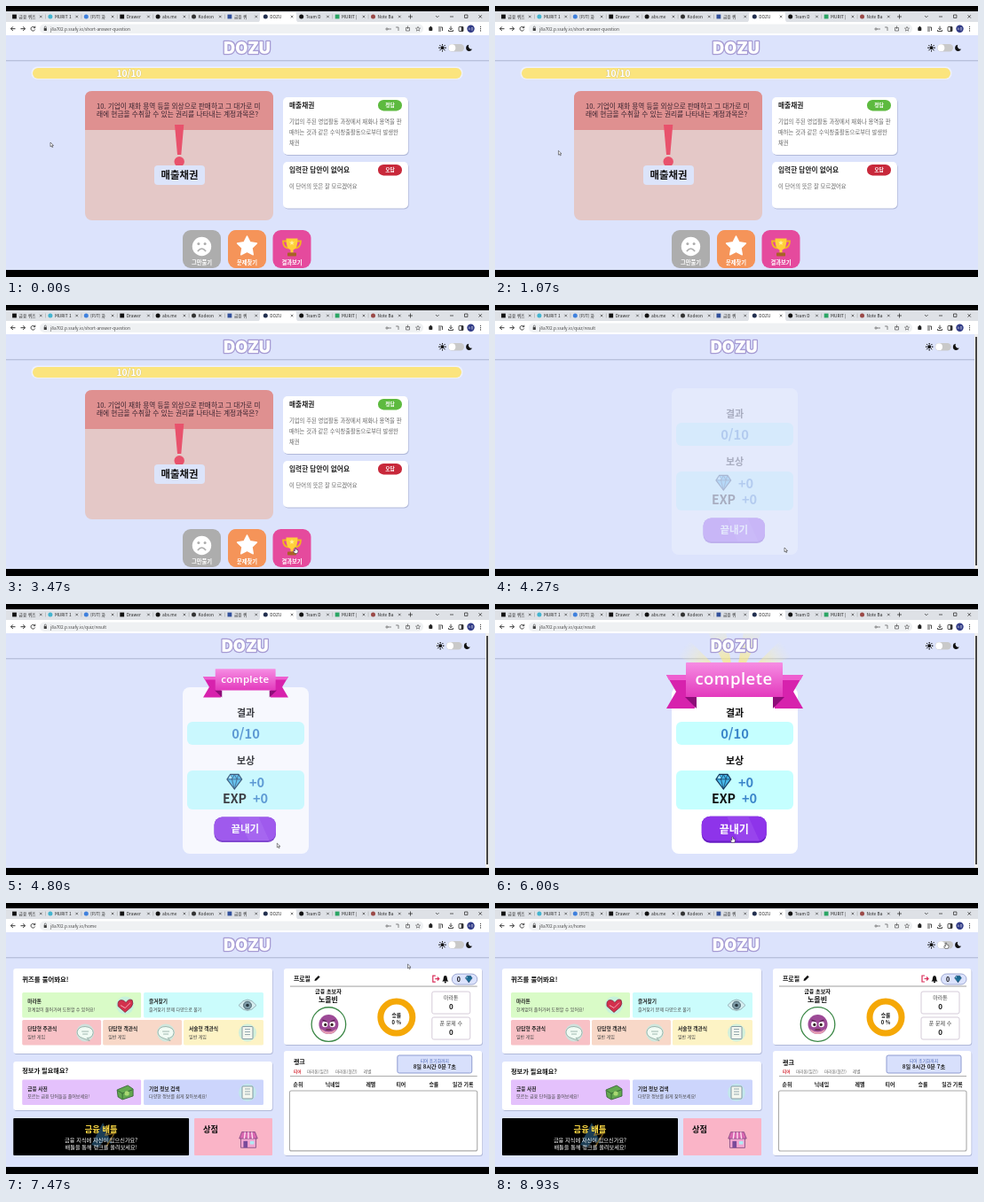
An HTML page for the animation above (8.99 s loop, 544 by 306 pixels).

```html
<!DOCTYPE html>
<html lang="ko">
<head>
<meta charset="utf-8">
<title>Quiz</title>
<style>
html, body { margin: 0; width: 100%; height: 100%; overflow: hidden; background: #000; }
svg { display: block; width: 100%; height: 100%; }
text { font-family: "Noto Sans CJK KR", "Noto Sans CJK", "Noto Sans", sans-serif; white-space: pre; }
.logo { font-family: Inter, sans-serif; font-weight: 900; }
.banner { font-family: "Open Sans", sans-serif; font-weight: 600; }
</style>
</head>
<body>
<svg id="stage" viewBox="0 0 544 306" preserveAspectRatio="none"></svg>
<script>
const LOOP = 8990, RESULT_AT = 4000, HOME_AT = 6640;
const stage = document.getElementById('stage');

// Markup helpers
const rect = (x, y, w, h, fill, r = 0, more = '') =>
  `<rect x="${x}" y="${y}" width="${w}" height="${h}" rx="${r}" fill="${fill}" ${more}/>`;
const circle = (x, y, r, fill, more = '') => `<circle cx="${x}" cy="${y}" r="${r}" fill="${fill}" ${more}/>`;
const path = (d, fill = 'none', stroke = 'none', w = 1, more = '') =>
  `<path d="${d}" fill="${fill}" stroke="${stroke}" stroke-width="${w}" ${more}/>`;
const text = (x, y, s, size, fill = '#222', bold = false, mid = false, more = '') =>
  `<text x="${x}" y="${y}" font-size="${size}" fill="${fill}"${bold ? ' font-weight="700"' : ''}${mid ? ' text-anchor="middle"' : ''} ${more}>${s}</text>`;
const group = (id, body, more = '') => `<g id="${id}" ${more}>${body}</g>`;
const at = (x, y, body, s = 1) => `<g transform="translate(${x} ${y}) scale(${s})">${body}</g>`;
const card = (x, y, w, h, r = 3, fill = '#fff') =>
  rect(x + .7, y + 1, w, h, '#8e98bd', r, 'opacity=".55"') + rect(x, y, w, h, fill, r);
const star = (n, R, r) => 'M' + Array.from({ length: n * 2 }, (_, i) => {
  const a = Math.PI * (i / n - .5), q = i % 2 ? r : R;
  return (q * Math.cos(a)).toFixed(2) + ' ' + (q * Math.sin(a)).toFixed(2);
}).join('L') + 'Z';
const gem = (fill) => path('M-5 -9H5L9 -3L0 9L-9 -3Z', fill, '#16375c', 1.2) +
  path('M-9 -3H9M-5 -9L-3 -3L0 9L3 -3L5 -9M-3 -3L0 -9L3 -3', 'none', '#16375c', .8) +
  path('M-5 -8L-3 -4H-7Z', '#b6f0ff');

function browser() {
  const tabs = [
    ['#111', '금융 퀴즈'], ['#42b4cf', 'MURIT 1'], ['#3f80dd', '[PJT] 화'], ['#111', 'Drawer'],
    ['#111', 'abs.me'], ['#333', 'Kodeon'], ['#31509b', '금융 퀴'], ['#23304f', 'DOZU'],
    ['#111', 'Team D'], ['#2ba565', 'MURIT |'], ['#9b4a48', 'Note Ba']
  ];
  let s = rect(0, 6, 544, 12.5, '#dee1e6') + rect(0, 18, 544, 15, '#fff') +
    path('M284 18.5Q286 18 286 15V9Q286 7 288 7H325Q327 7 327 9V15Q327 18 329 18.5Z', '#fff');
  tabs.forEach(([fill, name], i) => {
    const x = 9.5 + i * 40.4;
    s += (i % 3 ? circle(x, 12, 2.5, fill) : rect(x - 2.4, 9.6, 4.8, 4.8, fill)) +
      text(x + 5, 13.8, name, 4.8) +
      path(`M${x + 28.5} 10.7l2.6 2.6m0 -2.6l-2.6 2.6`, 'none', '#222', .6);
    if (i < 10 && i !== 6 && i !== 7) s += path(`M${x + 35} 9.5v5`, 'none', '#999', .5);
  });
  s += path('M453 12h5m-2.5 -2.5v5M484 11l1.8 1.8L487.6 11M500 12h4M516.5 10h3.4v3.4h-3.4zM532.5 10.2l3.4 3.4m0 -3.4l-3.4 3.4', 'none', '#222', .7);
  s += rect(38, 20.5, 432, 10.5, '#eff1f3', 5) + rect(42.7, 25, 3.2, 3, '#444', .5) +
    path('M43.3 25v-1a1 1 0 0 1 2 0v1', 'none', '#444', .6) +
    path('M10.5 25.7H5.5m2.3 -2.3l-2.3 2.3l2.3 2.3', 'none', '#222', .9) +
    path('M16.5 25.7h5m-2.3 -2.3l2.3 2.3l-2.3 2.3', 'none', '#222', .9) +
    path('M32.5 24.5a2.4 2.4 0 1 0 .2 2M32.8 22.7v2h-2', 'none', '#222', .8) +
    path('M430 26h4M439 24h3v4M450.5 24.5h4v3.5h-4zM452.5 26V22.5', 'none', '#555', .7) +
    circle(429, 26, 1.1, 'none', 'stroke="#555" stroke-width=".7"') +
    at(464, 26, path(star(5, 2.7, 1.2), 'none', '#555', .6)) +
    rect(476.3, 24, 4, 4, '#222', .8) + circle(478.4, 23.7, 1, '#222') +
    path('M487 24h4.5M487 26h3M487 28h3M491.5 24v4M501 22.7v4m-1.8 -1.6l1.8 1.6l1.8 -1.6M498.5 27v1.5h5V27', 'none', '#222', .8) +
    rect(510, 23.5, 5, 5, 'none', .5, 'stroke="#222" stroke-width=".8"') + rect(512.8, 23.5, 2, 5, '#222') +
    circle(523.5, 25.7, 4.2, '#303a86') + text(523.5, 27, '노을', 3.2, '#fff', false, true) +
    [23.5, 25.7, 27.9].map(y => circle(534.5, y, .6, '#222')).join('');
  return s + '<text id="url" x="50" y="27.6" font-size="4.8" fill="#444"></text>';
}

function header() {
  const rays = Array.from({ length: 8 }, (_, i) => `<path d="M0 -5V-7.4M0 5V7.4" transform="rotate(${i * 45}) scale(.56)" stroke="#111" stroke-width="1.5"/>`).join('');
  return text(271.5, 54, 'DOZU', 18.2, '#fff', false, true,
      'class="logo" stroke="#a69bd3" stroke-width="2.6" stroke-linejoin="round" paint-order="stroke"') +
    at(491.5, 47.2, circle(0, 0, 2, '#111') + rays) +
    rect(498, 43, 18, 8.4, '#c9c9c9', 4.2) + circle(502.4, 47.2, 3.9, '#fff') +
    path('M521.2 43.8a3.6 3.6 0 1 0 3.9 4.8a3.4 3.4 0 0 1 -3.9 -4.8Z', '#111');
}

function quiz() {
  const info = (y, h, title, fill, tag, lines) => card(312, y, 141, h, 5) +
    text(319, y + 12, title, 7.7, '#222', true) +
    rect(419, y + 3, 27, 12.4, fill, 6.2) + text(432.5, y + 11.4, tag, 5.8, '#fff', true, true) +
    lines.map((l, i) => text(319, y + 30 + i * 12, l, 6.3, '#666')).join('');
  const button = (x, fill, label, icon) => rect(x, 253, 43, 43, fill, 9) + at(x + 21.5, 271.5, icon) +
    text(x + 21.5, 291.5, label, 6.3, '#fff', true, true);
  const sad = circle(0, 0, 10.7, '#fff') + circle(-3.6, -3, 1.5, '#adadad') + circle(3.6, -3, 1.5, '#adadad') +
    path('M-4.6 5.5Q0 -.5 4.6 5.5', 'none', '#adadad', 1.6);
  const cup = path('M-6 -6H-10Q-10 1 -4 2M6 -6H10Q10 1 4 2', 'none', '#f2b321', 1.8) +
    path('M-6.5 -9H6.5Q6.5 3 1.5 4V7H-1.5V4Q-6.5 3 -6.5 -9Z', '#ffd039') +
    rect(-5, 7, 10, 4, '#a86226', .8) + path(star(5, 3, 1.3), '#fff2a0', 'none', 1, 'transform="translate(0 -4)"');
  return rect(28.5, 68.5, 486, 14.5, '#eef1ff', 7) + rect(30, 70, 483, 12, '#fbe47d', 6) +
    text(138.5, 79.6, '10/10', 10.2, '#fff', true, true, 'stroke="#c9bd86" stroke-width=".6" paint-order="stroke"') +
    rect(89, 96, 212, 146, '#e4c8c7', 8) + path('M89 140V104Q89 96 97 96H293Q301 96 301 104V140Z', '#df9090') +
    text(102, 116, '10. 기업이 재화 용역 등을 외상으로 판매하고 그 대가로 미', 7.65, '#3b2430') +
    text(102, 125.3, '래에 현금을 수취할 수 있는 권리를 나타내는 계정과목은?', 7.72, '#3b2430') +
    path('M190 134H200.3L197.3 168H193Z', '#e8526c') + circle(195.2, 175.8, 5.7, '#e8526c') +
    rect(167, 180, 57, 22, '#dce4fa', 4) + text(195.5, 195.2, '매출채권', 11.4, '#111', true, true) +
    info(103, 65, '매출채권', '#5dba3f', '정답', ['기업의 주된 영업활동 과정에서 재화나 용역을 판', '매하는 것과 같은 수익창출활동으로부터 발생한', '채권']) +
    info(176, 52.5, '입력한 답안이 없어요', '#c8293b', '오답', ['이 단어의 뜻은 잘 모르겠어요']) +
    button(199, '#adadad', '그만풀기', sad) +
    button(250, '#f59459', '문제찾기', path(star(5, 11.5, 5.8), '#fff', '#fff', 1.5, 'stroke-linejoin="round"')) +
    button(300.5, '#e54a9d', '결과보기', cup);
}

function result() {
  const blue = '#3b86ca';
  const rays = Array.from({ length: 10 }, (_, i) =>
    path('M0 0L-11 -72H11Z', 'url(#ray)', 'none', 1, `transform="rotate(${i * 36})"`)).join('');
  const tail = path('M-77 -5H-45V33H-77L-66 14Z', '#d722ad') + path('M-77 -5H-45V1H-74Z', '#ee5fd0') +
    path('M-56 20L-43 33V20Z', '#8d0d78');
  return group('rays', rays) +
    group('sheet', rect(199, 94, 142, 188, '#fff', 8) +
      text(270, 127, '결과', 11, '#111', true, true) + rect(204, 133, 132, 26, '#c5ffff', 6) +
      text(270, 152, '0/10', 14.7, blue, true, true) +
      text(270, 181, '보상', 11, '#111', true, true) + rect(204, 188, 132, 44, '#c5ffff', 6) +
      at(257.3, 200.7, gem('#45b9ea'), .93) + text(274, 206.6, '+0', 14.6, blue, true) +
      text(244, 225.4, 'EXP', 14.2, '#111', true) + text(278, 225.4, '+0', 14.6, blue, true) +
      group('done', rect(235, 240.5, 69.5, 28.5, '#671cc4', 9) + rect(235, 240.5, 69.5, 26.5, '#8e34ea', 9) +
        path('M262 240.5H285L297 267H274Z', '#a052f0', 'none', 1, 'opacity=".55"') +
        text(269.8, 258.4, '끝내기', 11.5, '#fff', true, true))) +
    group('ribbon', tail + `<g transform="scale(-1 1)">${tail}</g>` +
      rect(-55, -19, 109, 39, 'url(#pink)', 1) +
      text(-1, 6, 'complete', 18.6, '#fff', false, true, 'class="banner" letter-spacing=".4"'));
}

function home() {
  const tile = (x, y, w, fill, title, sub, icon, dx = 18) => rect(x, y, w, 28.5, fill, 1.5) +
    text(x + 6, y + 12.2, title, 5.7, '#222', true) + text(x + 6, y + 20.5, sub, 5, '#444') + at(x + w - dx, y + 14.5, icon);
  const glow = circle(0, 0, 10, '#bfeee6', 'opacity=".7"');
  const heart = glow + path('M0 8L-8 1Q-9 -6 -4 -6Q-1 -6 1 -3Q4 -8 8 -6Q10 -2 7 2Z', '#d3304c', '#74263b', .7) + path('M-5 0L0 3L6 -3', 'none', '#f6a9b8', 1);
  const eye = path('M-10 0Q0 -13 10 0Q0 12 -10 0Z', '#d5eef0', '#8aa5ac', .8) + circle(0, 0, 4.4, '#7f9ca8', 'stroke="#4a626d"') + circle(0, 0, 1.8, '#26363f');
  const bubble = glow + path('M-9 -1Q-8 -7 0 -7Q9 -6 9 0Q8 6 2 6L5 9L-3 6Q-9 4 -9 -1Z', '#f1fbf4', '#7d9b92', .7) + path('M-4 -1.5H4M-3 1.5H3', 'none', '#8aa69d', .8);
  const book = path('M-9 -3L3 -8L9 -4V4L-3 8L-8 5Z', '#63a850', '#2f5d30', .8) + path('M-8 -2L-3 1V7M-3 1L8 -3', 'none', '#2f5d30', .8) + circle(2, 1, 2.6, '#a9d874');
  const memo = glow + rect(-6, -7, 12, 14, '#f4f7ef', 1, 'stroke="#6d8290" stroke-width=".8"') + path('M-3 -4H3M-3 -1H3M-3 2H3', 'none', '#8aa0a8', .9);
  const shop = rect(-9, -2, 18, 12, '#f3a5d0', 0, 'stroke="#74407a" stroke-width=".8"') +
    path('M-8 -9H8L11 -1H-11Z', '#d867b0', '#74407a', .8) + path('M-4 -9L-5 -1M0 -9V-1M4 -9L5 -1', 'none', '#ffe0ef', 1.5) +
    rect(-6, 2, 5, 8, '#7a4a9a') + rect(2, 2, 5, 4, '#aeeaf2');
  const face = circle(0, 0, 11, '#9c4a96') + path('M-9 5Q0 12 9 5Q6 11 0 11Q-6 11 -9 5Z', '#e8a0b4') +
    circle(-4.2, 0, 3.2, '#fff') + circle(4.2, 0, 3.2, '#fff') + circle(-3.7, .4, 1.6, '#322') + circle(3.7, .4, 1.6, '#322') +
    path('M-7 -5L-2 -3M7 -5L2 -3', 'none', '#54224f', 1.2) + path('M-3 6H3', 'none', '#522', 1.1);
  const stat = (y, label) => rect(480, y, 43, 25, '#fff', 2, 'stroke="#d5cbd9" stroke-width="1"') +
    text(501.5, y + 8.8, label, 6, '#444', false, true) + text(501.5, y + 20.3, '0', 8, '#111', true, true);
  const cols = [[329, '순위'], [368, '닉네임'], [411, '레벨'], [445, '티어'], [482, '승률'], [515, '일간 기록']];
  return card(8, 74, 292, 96) + text(18, 89, '퀴즈를 풀어봐요!', 7.4, '#111', true) +
    tile(18, 101, 134, '#d9fbc7', '마라톤', '한계없이 풀어가며 도전할 수 있어요!', heart) +
    tile(155, 101, 135, '#cbfcfc', '즐겨찾기', '즐겨찾기 문제 다양으로 풀기', eye) +
    tile(18, 132, 89, '#f8c1c6', '단답형 주관식', '일반 게임', bubble) +
    tile(109, 132, 89, '#f8d8c8', '단답형 객관식', '일반 게임', bubble) +
    tile(200, 132, 90, '#fdf3c5', '서술형 객관식', '일반 게임', memo) +
    card(8, 179, 292, 55) + text(18, 192.5, '정보가 필요해요?', 7.2, '#111', true) +
    tile(18, 199.5, 134, '#e4c1fc', '금융 사전', '모르는 금융 단어들을 풀어보세요!', book) +
    tile(155, 199.5, 135, '#ccd5fc', '기업 정보 검색', '다양한 정보를 쉽게 찾아보세요!', memo) +
    rect(8, 243, 198, 42, '#000', 1) + path('M96 273L109 248L119 272L110 268L104 276Z', '#2c5f82', 'none', 1, 'opacity=".65"') +
    path('M116 250L112 262L122 260L113 275', 'none', '#b98b2d', 1.5, 'opacity=".6"') +
    text(107, 259, '금융 배틀', 9.3, '#ffdc45', true, true) +
    text(107, 269.6, '금융 지식에 자신이 있으신가요?', 6.2, '#fff', false, true) +
    text(107, 277.6, '배틀을 통해 랭크를 올려보세요!', 6.2, '#fff', false, true) +
    rect(212, 243, 88, 42, '#fab4c7', 1, 'id="shop"') + text(222, 259, '상점', 9.2, '#111', true) + at(273, 267, shop, .93) +
    card(313, 74, 223.5, 86) + text(324, 88, '프로필', 6.9, '#111', true) +
    path('M347.5 88L348 85.8L352 81.8L353.7 83.5L349.7 87.5Z', '#111') + path('M320 94H531', 'none', '#777', .7) +
    path('M484 82H481V89H484M483.5 85.5H488M486 83.5L488 85.5L486 87.5', 'none', '#d92d59', 1.2) +
    path('M491.5 88.5Q493 87 493 84.5Q493 82 495 82Q497 82 497 84.5Q497 87 498.5 88.5Z', '#111') + circle(495, 89.3, 1, '#111') +
    rect(502.5, 80, 28.5, 12, '#dbe2fc', 6, 'stroke="#8d99c8" stroke-width=".8"') + text(510, 88.8, '0', 7, '#111', true, true) + at(521.5, 86, gem('#1f7fa8'), .42) +
    group('rookie', text(363, 102.4, '금융 초보자', 6.1, '#111', true, true)) +
    group('nick', text(363, 112, '노을빈', 8, '#111', true, true)) +
    group('avatar', circle(363.5, 137, 19.3, '#fff', 'stroke="#3c8847" stroke-width="1.3"') + group('face', face, 'transform="translate(363.5 137)"')) +
    circle(440, 129, 18, 'none', 'stroke="#f5a807" stroke-width="7"') +
    text(440, 128.5, '승률', 5.8, '#111', true, true) + text(440, 137, '0 %', 5.8, '#111', true, true) +
    stat(100, '마라톤') + stat(129, '푼 문제 수') +
    card(313, 167, 223.5, 118) + text(324, 182.5, '랭크', 7, '#111', true) +
    rect(441, 172, 84, 20, '#d8e0fc', 2, 'stroke="#8e9bd0" stroke-width="1"') +
    text(483, 180, '티어 초기화까지', 4.8, '#4b67b5', false, true) +
    text(483, 187.4, '8일 8시간 0분 7초', 6.2, '#222', true, true) +
    text(324, 192, '티어', 4.7, '#d52c36', true) + text(339, 192, '마라톤(일간)', 4.7, '#666') +
    text(371, 192, '마라톤(월간)', 4.7, '#666') + text(403, 192, '레벨', 4.7, '#666') +
    path('M320 195.5H531', 'none', '#888', .7) +
    cols.map(([x, s]) => text(x, 207, s, 5.9, '#111', true, true)).join('') +
    rect(319.5, 212, 211.5, 68, '#fff', 2, 'stroke="#aaa" stroke-width="1.1"');
}

stage.innerHTML = `<defs>
  <linearGradient id="pink" x2="0" y2="1"><stop stop-color="#f68de3"/><stop offset="1" stop-color="#e33abd"/></linearGradient>
  <radialGradient id="ray" gradientUnits="userSpaceOnUse" cx="0" cy="0" r="72">
    <stop offset=".3" stop-color="#ffe96b"/><stop offset="1" stop-color="#fff6b0" stop-opacity="0"/></radialGradient>
  </defs>` + rect(0, 0, 544, 306, '#000') + rect(0, 33, 544, 265, '#dce3fc') +
  rect(0, 61, 544, 1.4, '#b9c1dc') +
  group('quiz', quiz()) + group('result', result()) + group('home', home()) +
  group('header', header()) + browser() +
  group('bar', rect(540, 33, 4, 265, '#eee') + rect(541, 36, 2, 258, '#444')) +
  group('arrow', path('M0 0V6L1.4 4.7L2.4 7L3.5 6.5L2.5 4.3H4.4Z', '#fff', '#111', .6)) +
  group('hand', path('M-.8 0Q0 -1 .8 0V2.6L3.6 3.3V6L2.8 8H-1.2L-3 5L-2.4 4.2L-.8 5Z', '#fff', '#111', .6));

const el = {};
stage.querySelectorAll('[id]').forEach(n => el[n.id] = n);
const show = (n, on) => n.setAttribute('display', on ? 'inline' : 'none');
const move = (n, s) => n.setAttribute('transform', s);
const clamp = v => Math.max(0, Math.min(1, v));
const part = (t, from, ms) => clamp((t - from) / ms);
const smooth = p => p * p * (3 - 2 * p);
const outBack = p => 1 + 2.7 * (p - 1) ** 3 + 1.7 * (p - 1) ** 2;

// Pointer stops: time, x, y
const stops = [[0, 50, 154], [900, 50, 154], [1900, 326, 274], [4400, 326, 274], [5400, 267.5, 263],
  [6850, 267.5, 263], [7400, 452.5, 69], [8000, 452.5, 69], [8700, 508, 45], [LOOP, 508, 45]];
function pointer(t) {
  const i = stops.findIndex(s => s[0] > t), a = stops[i - 1], b = stops[i];
  const p = smooth((t - a[0]) / (b[0] - a[0]));
  return [a[1] + (b[1] - a[1]) * p, a[2] + (b[2] - a[2]) * p];
}

function draw(t) {
  const onHome = t >= HOME_AT, onResult = t >= RESULT_AT && !onHome;
  show(el.quiz, t < RESULT_AT);
  show(el.result, onResult);
  show(el.home, onHome);
  show(el.bar, onResult);
  move(el.header, `translate(${onResult ? -2.3 : 0} 0)`);
  el.url.textContent = 'j8a702.p.ssafy.io/' + (onHome ? 'home' : onResult ? 'quiz/result' : 'short-answer-question');

  const [x, y] = pointer(t);
  const overDone = onResult && x < 304 && y < 269;
  const overShop = onHome && x < 300 && y > 243;
  const hand = overDone || overShop || (t > 1800 && t < RESULT_AT) || t > 8600;
  show(el.hand, hand);
  show(el.arrow, !hand);
  move(hand ? el.hand : el.arrow, `translate(${x} ${y}) scale(.8)`);

  if (onResult) {
    const pop = part(t, 4700, 600);
    el.sheet.setAttribute('opacity', part(t, RESULT_AT + 20, 1000));
    show(el.ribbon, pop > 0);
    move(el.ribbon, `translate(270 85) scale(${outBack(pop)})`);
    el.rays.setAttribute('opacity', .75 * part(t, 4900, 500));
    move(el.rays, `translate(270 92) rotate(${(t - 6000) * .02 + 18}) scale(${pop})`);
    const s = overDone ? 1.05 : 1;
    move(el.done, `translate(269 255) scale(${s}) translate(-269.5 -255)`);
  }
  if (onHome) {
    const s = .8 + .2 * (1 - (1 - part(t, HOME_AT, 1000)) ** 3);
    move(el.home, `translate(272 180) scale(${s}) translate(-272 -180)`);
    const ready = t >= 7000;
    show(el.nick, ready);
    show(el.face, ready);
    move(el.rookie, `translate(0 ${ready ? 0 : 7})`);
    move(el.avatar, `translate(0 ${ready ? 0 : -5})`);
    el.shop.setAttribute('fill', overShop ? '#eaabbe' : '#fab4c7');
  }
}

function tick() {
  draw(performance.now() % LOOP);
  requestAnimationFrame(tick);
}
tick();
</script>
</body>
</html>
```
